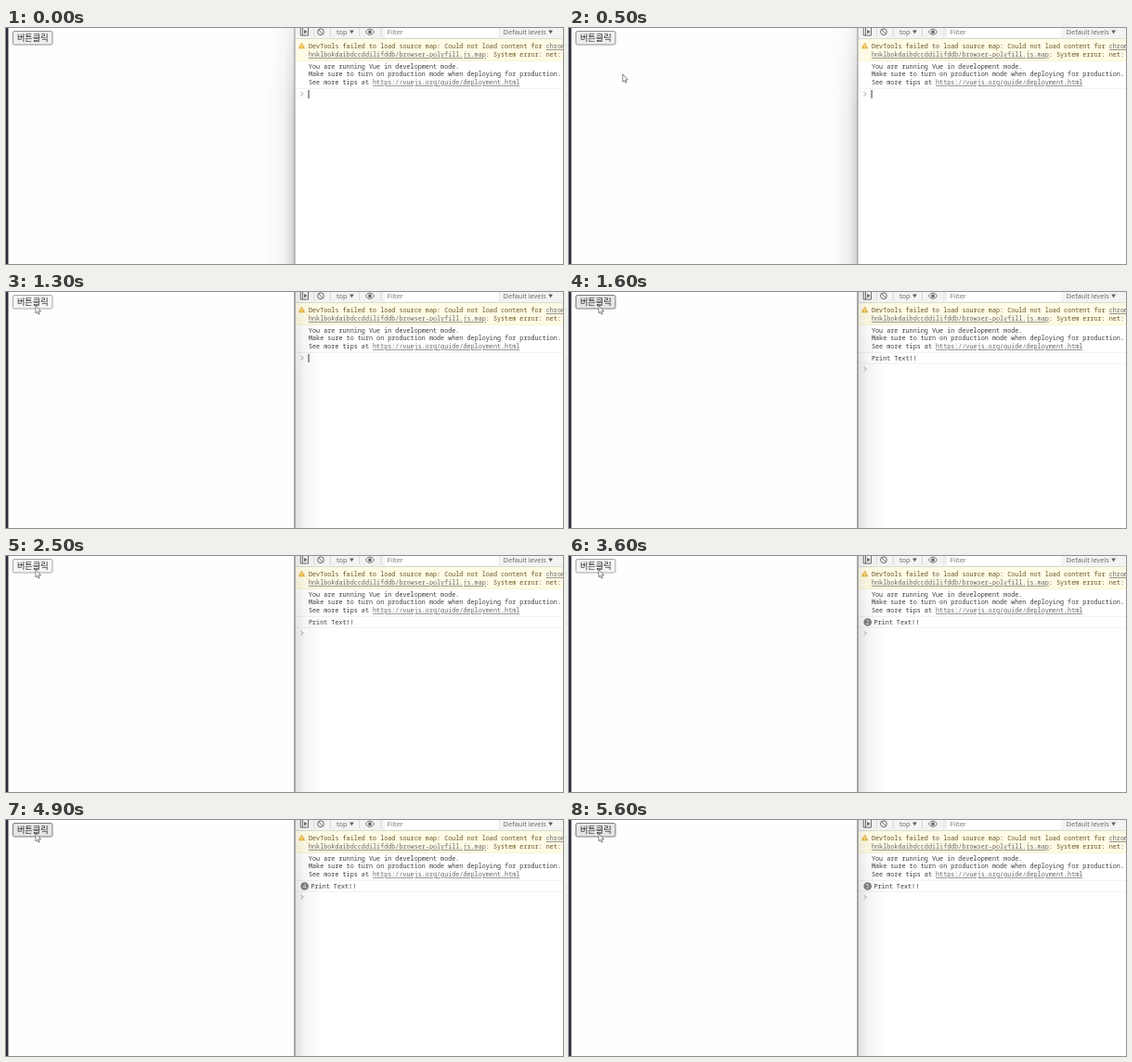
Write an HTML page that moves like this. It is 600x255 px and loops after 6.6 s.

```html
<!DOCTYPE html>
<html lang="ko">
<head>
<meta charset="utf-8">
<title>Button click console demo</title>
<style>
  html, body { margin: 0; width: 100%; height: 100%; overflow: hidden; background: #fff; }
  svg { display: block; width: 600px; height: 255px; }
  text { white-space: pre; }
  .mono { font: 6.78px "Noto Sans Mono", "DejaVu Sans Mono", monospace; fill: #3c3c3c; }
  .mono .warn { fill: #6b5320; }
  .mono .link { text-decoration: underline; text-decoration-thickness: .5px; fill: #666; }
  .ui { font: 7.4px "Open Sans", "Noto Sans", sans-serif; fill: #666; }
  .label { font: 9.2px "Noto Sans CJK KR", "Noto Sans CJK", sans-serif; fill: #2a2a2a; text-anchor: middle; }
  .digit { font: 6.4px "Open Sans", sans-serif; fill: #fff; text-anchor: middle; }
</style>
</head>
<body>
<svg viewBox="0 0 600 255">
  <defs>
    <linearGradient id="fadeLeft">
      <stop offset="0" stop-color="#000" stop-opacity="0"/>
      <stop offset=".4" stop-color="#000" stop-opacity=".015"/>
      <stop offset=".7" stop-color="#000" stop-opacity=".055"/>
      <stop offset=".9" stop-color="#000" stop-opacity=".13"/>
      <stop offset="1" stop-color="#000" stop-opacity=".2"/>
    </linearGradient>
    <linearGradient id="fadeRight">
      <stop offset="0" stop-color="#000" stop-opacity=".12"/>
      <stop offset=".35" stop-color="#000" stop-opacity=".045"/>
      <stop offset="1" stop-color="#000" stop-opacity="0"/>
    </linearGradient>
    <linearGradient id="down" x2="0" y2="1">
      <stop offset="0" stop-color="#666"/>
      <stop offset=".35" stop-color="#fff"/>
    </linearGradient>
    <mask id="soft" maskUnits="userSpaceOnUse" x="0" y="0" width="600" height="255">
      <rect width="600" height="255" fill="url(#down)"/>
    </mask>
  </defs>

  <!-- page -->
  <rect width="600" height="255" fill="#fefefe"/>
  <rect width="2.5" height="255" fill="#2d2a3c"/>
  <rect id="button" x="7.5" y="3.5" width="42.5" height="14.5" rx="1.6" stroke-width=".9"/>
  <text class="label" x="28.8" y="14">버튼클릭</text>

  <!-- console -->
  <rect x="311.5" width="288.5" height="255" fill="#fff"/>
  <rect x="311.5" width="288.5" height="11.5" fill="#f3f3f3"/>
  <rect x="408" width="122" height="10" fill="#fff"/>
  <path d="M311.5 11.5H600" stroke="#d4d4d4" stroke-width=".8"/>
  <path d="M331.5 0V9M349.5 0V9M380.5 0V9M404 0V9" stroke="#d0d0d0" stroke-width=".7"/>
  <g fill="none" stroke="#5f5f5f" stroke-width=".9">
    <path d="M317.3 0V8H325.5V0M319.5 0V8"/>
    <circle cx="339" cy="4.2" r="3.4"/>
    <path d="M336.6 1.8L341.4 6.6"/>
    <path d="M387.3 4.2Q392 -2 396.7 4.2Q392 10.4 387.3 4.2Z"/>
  </g>
  <g fill="#5f5f5f">
    <circle cx="392" cy="4.2" r="1.8"/>
    <path d="M321.2 1.8L324.4 4.1L321.2 6.4ZM370 2.6H374.8L372.4 6.2ZM584.2 2.6H589L586.6 6.2Z"/>
  </g>
  <g class="ui">
    <text x="356" y="6.8">top</text>
    <text x="410.5" y="7" fill="#777">Filter</text>
    <text x="535.6" y="6.8">Default levels</text>
  </g>

  <rect x="311.5" y="12" width="288.5" height="23" fill="#fffbe6"/>
  <path d="M311.5 35.4H600" stroke="#f8efc4" stroke-width=".8"/>
  <path d="M318.6 16.4L321.6 21.8H315.6Z" fill="#f6c64a" stroke="#e0a321" stroke-width=".8" stroke-linejoin="round"/>
  <path d="M318.6 18V20.2M318.6 20.7V21.3" stroke="#fff" stroke-width=".7"/>
  <g class="mono">
    <text class="warn" x="326" y="22.3">DevTools failed to load source map: Could not load content for <tspan class="link">chrome</tspan></text>
    <text class="warn" x="326" y="31.3"><tspan class="link">hnklbokdaibdccddilifddb/browser-polyfill.js.map</tspan>: System error: net:</text>
    <text x="326" y="43.5">You are running Vue in development mode.</text>
    <text x="326" y="52.4">Make sure to turn on production mode when deploying for production.</text>
    <text x="326" y="61.3">See more tips at <tspan class="link">https://vuejs.org/guide/deployment.html</tspan></text>
  </g>
  <path d="M311.5 65.3H600" stroke="#ececec" stroke-width=".8"/>

  <g id="log">
    <text id="message" class="mono" y="74.2">Print Text!!</text>
    <path d="M311.5 77.3H600" stroke="#ececec" stroke-width=".8"/>
    <g id="badge">
      <circle cx="321.7" cy="71.5" r="4.3" fill="#808080"/>
      <text id="count" class="digit" x="321.7" y="73.8"></text>
    </g>
  </g>
  <path id="prompt" d="M317.4 69L320.3 71.3L317.4 73.6" fill="none" stroke="#9ba0aa" stroke-width=".9"/>
  <rect id="caret" x="325.6" y="67" width=".9" height="9" fill="#222"/>

  <!-- window edge and shadows -->
  <rect id="shadeLeft" x="275" width="36" height="255" fill="url(#fadeLeft)" mask="url(#soft)"/>
  <rect id="shadeRight" x="311.5" width="28" height="255" fill="url(#fadeRight)" mask="url(#soft)"/>
  <rect id="edge" x="310.5" width="1" height="255"/>

  <path id="cursor" d="M0 0V8.2L1.8 6.6L3 9.4L4.3 8.8L3.1 6.1H5.6Z" fill="#fff" stroke="#444" stroke-width=".65" stroke-linejoin="round"/>
</svg>
<script>
  const LOOP = 6600;
  const STEP = 100;
  const presses = [[1300, 1500], [2500, 2600], [3600, 3700], [4500, 4700], [5400, 5600]];
  const looks = {
    idle: ["#efefef", "#858585"],
    hover: ["#e5e5e5", "#707070"],
    down: ["#f5f5f5", "#9c9c9c"]
  };

  const el = id => document.getElementById(id);
  const set = (id, attrs) => {
    for (const key in attrs) el(id).setAttribute(key, attrs[key]);
  };
  const show = (id, on) => set(id, { visibility: on ? "inherit" : "hidden" });
  const mix = (a, b, p) => a + (b - a) * p;

  function draw(time) {
    const t = Math.floor(time / STEP) * STEP;

    const p = Math.max(0, Math.min(1, (t - 200) / 600));
    const eased = 1 - (1 - p) ** 2.5;
    const x = mix(178, 32, eased), y = mix(214, 14.7, eased);
    show("cursor", t >= 200);
    set("cursor", { transform: `translate(${x} ${y})` });

    const down = presses.some(([from, to]) => t >= from && t < to);
    const over = x < 50 && y < 18;
    const [fill, stroke] = looks[down ? "down" : over ? "hover" : "idle"];
    set("button", { fill, stroke });

    // each release logs the message once more
    const count = presses.filter(([, to]) => t >= to).length;
    show("log", count > 0);
    show("badge", count > 1);
    el("count").textContent = count;
    set("message", { x: count > 1 ? 328.5 : 326 });
    set("prompt", { transform: `translate(0 ${count ? 12 : 0})` });

    const pageActive = t >= 1300;
    show("caret", t < 1400);
    show("shadeLeft", !pageActive);
    show("shadeRight", pageActive);
    set("edge", { fill: pageActive ? "#55555c" : "#8e8e92" });
  }

  const start = performance.now();
  function tick() {
    draw((performance.now() - start) % LOOP);
    requestAnimationFrame(tick);
  }
  tick();
</script>
</body>
</html>
```
